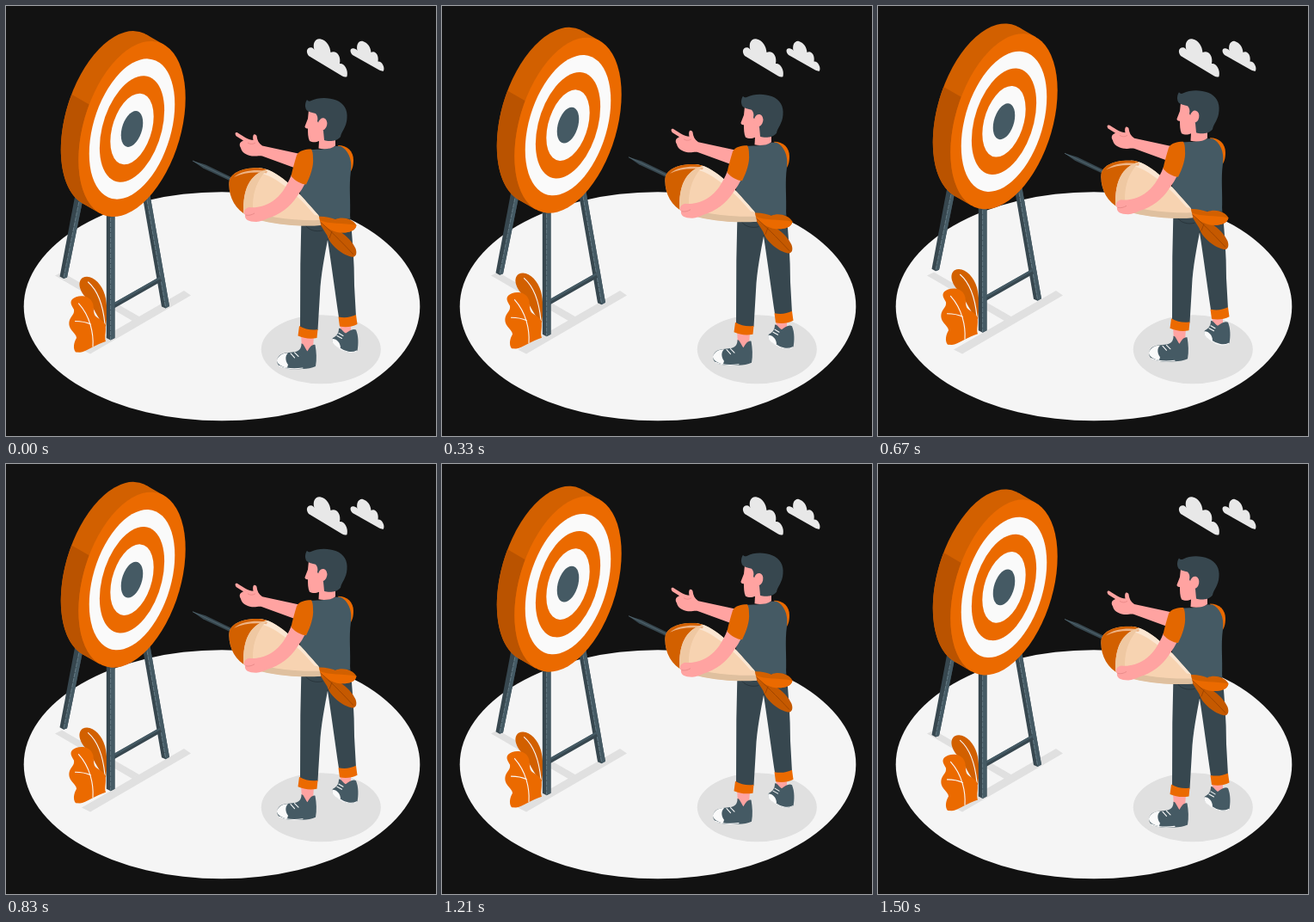
These frames come from a looping animation (500x500 px, 1540 ms). An HTML page:

```html
<!DOCTYPE html>
<html lang="en">
<head>
<meta charset="utf-8">
<title>Aim</title>
<style>
  html, body { margin: 0; width: 100%; height: 100%; overflow: hidden; background: #121212; }
  svg { display: block; width: 100%; height: 100%; }
  .main { fill: #eb6a00; }
  .mid { fill: #d26000; }
  .deep { fill: #ba5300; }
  .dark { fill: #37474f; }
  .slate { fill: #455a64; }
  .skin { fill: #ffa3a1; }
  .white { fill: #fafafa; }
  .cloud { fill: #e8e8e8; }
  .shade { fill: #e0e0e0; }
  .line { fill: none; stroke: #fafafa; stroke-width: 1.1; stroke-linecap: round; }
  .seam { fill: none; stroke: #8299a3; stroke-width: .6; stroke-dasharray: 5 1; }
  .fold { fill: none; stroke: #263238; stroke-width: .8; stroke-linecap: round; }
  .crease { fill: none; stroke: #e58684; stroke-width: .8; }
</style>
</head>
<body>
<svg viewBox="0 0 500 500">
  <defs>
    <clipPath id="body"><path id="hull" d="M259.5 204 C262 192 279 187 297 188.500 C320 192 342 219 364 244 L366 255 C342 257 302 254 281 244 C266 237 258 220 259.5 204Z"/></clipPath>
  </defs>

  <ellipse cx="251" cy="349.3" rx="230.3" ry="133" fill="#f5f5f5"/>
  <g class="shade">
    <ellipse cx="366.3" cy="399.3" rx="69.5" ry="40"/>
    <path d="M57 313.5 L65 309.5 L160 364 L152 369Z"/>
    <path d="M88 399.5 L207 331 L215 336.5 L98 404.5Z"/>
  </g>
  <g class="cloud">
    <path d="M352 58 C348 53 350 47 356 48.5 C357 49 358 50 358.5 51 C356 43 360 37 366 38.500 C373 40 377 47 377.500 54 C384 51 390 58 388 67 C393 66 398.500 74 396.500 82 C395 83 393 82.500 391 81.500Z"/>
    <path d="M403 57 C399 53 400 48 405 49.500 C407 50 408 51 408.500 52 C407 45 410 40 415 41 C421 43 424 48 424.500 54 C429 51 434 57 432.500 64.500 C437 64 441 71 439 75.500 C438 76 436 75.500 434 74.500Z"/>
  </g>

  <g id="float">
    <!-- stand -->
    <path class="dark" d="M80 222 L90 222 L71 315.500 L67 317 L62.500 314.500Z"/>
    <path class="slate" d="M86 222 L90 222 L71 315.500 L67 317Z"/>
    <path class="seam" d="M86 222 L67 316"/>
    <path class="dark" d="M158.500 220 L167.500 220 L190 349 L185.500 351.500 L181 349.500Z"/>
    <path class="slate" d="M163 220 L167.500 220 L190 349 L185.500 351.500Z"/>
    <path class="seam" d="M163 220 L185.500 350"/>
    <path class="dark" d="M124 346 L179.500 314.500 L181 320 L124 352.500Z"/>
    <path class="slate" d="M124 346 L179.500 314.500 L180 317 L124 349Z"/>

    <!-- plant -->
    <path class="mid" d="M114 372 C106 361 101 350 95 341 C86 333 82 321 89 316 C99 311 111 322 115 336 C118 348 118 361 116 373Z"/>
    <path class="line" d="M95.500 321 C107 331 113 349 115 370"/>
    <path class="main" d="M81 402.500 C77.500 398 79 391 82 386 C82 380 72 377 73.500 367 C74.500 361 80 359 79 353 C77 349 73.500 345 77 341 C82 336 95 335.500 99.500 343 C103 348 101 353 103 359 C106 364 113 364 115.500 371 C117 378 114 385 116 390 C105 393 93 402 86 402.800Z"/>
    <path class="line" d="M101 396 C102 381 98 361 84.500 346 M98.500 370 C93 367.500 87 366.500 80.500 366.500"/>

    <path class="dark" d="M116.800 230 L126.500 230 L126.500 386 L121.600 388.500 L116.800 386Z"/>
    <path class="slate" d="M121.600 230 L126.500 230 L126.500 386 L121.600 388.500Z"/>
    <path class="seam" d="M121.600 240 L121.600 388"/>

    <!-- target, circles sheared onto its plane -->
    <g transform="matrix(.622 -.36 0 .955 146.500 143)">
      <circle class="mid" cx="-33" cy="-24.800" r="100"/>
      <path class="mid" d="M60 -80 L27 -104.800 L-93 55.200 L-60 80Z"/>
      <path class="deep" d="M-80 -60 L-113 -84.800 A100 100 0 0 0 -93 55.200 L-60 80 A100 100 0 0 1 -80 -60Z"/>
      <circle class="main" r="100"/>
      <circle class="white" r="80"/>
      <circle class="main" r="60.500"/>
      <circle class="white" r="40.500"/>
      <circle class="slate" r="20.500"/>
    </g>

    <!-- legs and shoes -->
    <path class="skin" d="M388.500 369 L401 369 L401 380 L395 383 L389 379Z M343 382 L358 384 L357 398 L350 404 L344 397Z"/>
    <path class="slate" d="M387 375 C389 373.500 391 378 395 380.500 C399 378 403 374.500 407 376.500 C410 384 410 393 408.500 401 C402 404.500 394 402.500 388 398 C382 394.500 377.500 390 380 386 C384 384 387 381 387 375Z"/>
    <path class="white" d="M379.500 387 C384 386.500 388.500 391 389 397 L388 398.500 C382 395 378 391 379.500 387Z"/>
    <path class="line" d="M385 383.500 L390.500 386.500 M387 380.500 L392 383.500 M388 398 C394 402.500 402 404 408 401"/>
    <path class="slate" d="M343.500 392.500 C346 392 347 397 350.500 401.500 C353 397 356 393 359.500 394 C361 402 361.500 411 360 419 C356 421 350 422 345 422 C336 422.500 325 423 318 418.500 C313.500 415 314.500 408 320 405 C326 402.500 332 403 337 402 C342 400.500 343.500 397 343.500 392.500Z"/>
    <path class="white" d="M315 411.500 C317 406 323 403 328 403.500 C324 407 325 413 328 417 L327 420.500 C321 420 314.500 416 315 411.500Z"/>
    <path class="line" d="M331 404 L335.500 409 M335.500 403 L340 407.500 M318 418.500 C326 422 338 422 345 421"/>
    <path class="dark" d="M343.500 245 L400 243 C403 270 405 297 405 325 L407 361 C400 364 393 364 387 362 C383 335 379 305 374 272 C371 288 366 312 365 335 L362.500 377 C355 379 348 377 342 374 L342.300 300Z"/>
    <path class="fold" d="M347 253 C351 261 360 263 368 261 M374 272 L378 262"/>
    <path class="main" d="M341 372 C348 376 356 377.500 362.500 376 L361.500 386 C354 387.500 346 386.500 339.500 383.500Z M386.500 361.500 C394 363 401 362 407 359 L408.500 370 C402 373.500 394 374 388 372.500Z"/>

    <!-- torso and head -->
    <path class="main" d="M386 162 C397 162 404 169 404 179 C404 186 402.500 190 400.500 193 L392 176Z"/>
    <path class="slate" d="M354 167 C364 167 375 166.500 383 163 L389 163 C397 167 403 177 401 192 C398.500 210 401 226 400 247 L343.500 249 C342 232 341 219 343 210 C347 195 352 178 354 167Z"/>
    <path class="skin" d="M352 121 L368 121 L374 147 L383 154 L383 162.500 C378 166.500 369 167 363.500 165.500 L364 157 C360 159 356 158.500 353 157 C351 153 351 147 351 142.500 C348.500 142.500 346.800 141 347.800 139.300 L351 131Z"/>
    <path class="dark" d="M349.500 121 C347 117 348 112 350 109 C351.500 111 353 111 355 110 C363 106 375 106 384 109.500 C393 113 397.500 121 396.500 130.500 C396 141 390 146 389 152 C385 157.500 375 158 370 156 L369 145 L362 134 C363 130 362 127 360 125 C356 124 352 123.500 349.500 121Z"/>
    <ellipse class="skin" cx="368" cy="137.500" rx="5.300" ry="7.300" transform="rotate(12 368 137.500)"/>

    <!-- pointing arm -->
    <path class="skin" d="M342 172 L298 162.500 C294 160 292 156 291.500 151 C290 148 286 148 287.500 156 C282 156 277 152 269.500 147.500 C266.500 146 265.500 149 268 151.500 L276 156.500 C272 158 270.500 161 273 165 C274 170 279 173.500 286 174.500 C291 175 294 173.500 298 174.500 L335 188Z"/>
    <path class="crease" d="M281 159 C284 161 287 161 290 159"/>

    <!-- dart -->
    <path class="dark" d="M216.500 179.800 L232 184.500 L263 199.500 L261 203.500 L229 188.500Z"/>
    <path d="M217 180 L262 201.500" stroke="#5c727c" stroke-width=".7"/>
    <path fill="#c55900" d="M361 247 C378 254 401 268 406.500 282 C409 289 406 293 401 291.500 C388 288 376 276 373.500 267Z"/>
    <path class="mid" d="M360 245 C369 244 376 245.500 383 248 C391 244.500 403 247 407.500 255 C406 263 395 264.500 385 263 C376 261 368 255 362 252Z"/>
    <path class="main" d="M364 249 C377 254 391 252 407.500 255 C406 263 395 264.500 385 263 C376 261 369 255 364 249Z"/>
    <path d="M364 250 C376 260 388 272 404 289 M379 262 L376 270" fill="none" stroke="#964100" stroke-width=".8"/>
    <g clip-path="url(#body)">
      <use href="#hull" fill="#f7d3b1"/>
      <path d="M276 235 C300 246 333 250 370 249 L370 262 L276 262Z" fill="#dfc09f"/>
      <path d="M296 184 C318 190 344 217 366 244 L359 243 C339 220 317 199 292 193Z" fill="#fbe6d2"/>
      <path class="mid" d="M255 180 L308 180 L304 190 C284 195 273 213 277 250 L255 250Z"/>
      <path d="M265 199 C275 191 290 190 304 192 L303 194.500 C290 192.500 276 194 265 199Z" fill="#eeb487"/>
      <path d="M304 190 C284 195 273 213 277 250 L289 250 C284 225 289 205 304 190Z" fill="#efc8a2"/>
    </g>

    <!-- holding arm -->
    <path class="skin" d="M332 196 C326 211 319 221 310 227 C301 233 291 235 283 234 C277 235 275.500 240 278 243 C277 248 282 251 291 251 C296 250.500 300 249 304 247 C318 243 331 233 338 222 C343 215 346 210 349 204Z"/>
    <path class="crease" d="M278.500 243 C282 244 286 243 289 241"/>
    <path fill="#e36700" d="M355 166.500 C348 166.500 341 168 338 173.500 C335.500 182 333 190 331.500 198 C337 204 343 207 349 207.500 C354 198 358 186 357 177 C357 172 356.500 169 355 166.500Z"/>
  </g>
</svg>
<script>
  const LOOP = 1540, HALF = LOOP / 2, LIFT = 10, PEAK = 735, BASE = .45;
  const scene = document.getElementById("float");

  // Even rise to the peak, then an even fall
  function draw(time) {
    const away = Math.abs(time % LOOP - PEAK);
    const height = LIFT * (1 - Math.min(away, LOOP - away) / HALF);
    scene.setAttribute("transform", `translate(0 ${(BASE - height).toFixed(3)})`);
  }

  function tick(now) {
    draw(now);
    requestAnimationFrame(tick);
  }
  draw(0);
  requestAnimationFrame(tick);
</script>
</body>
</html>
```
